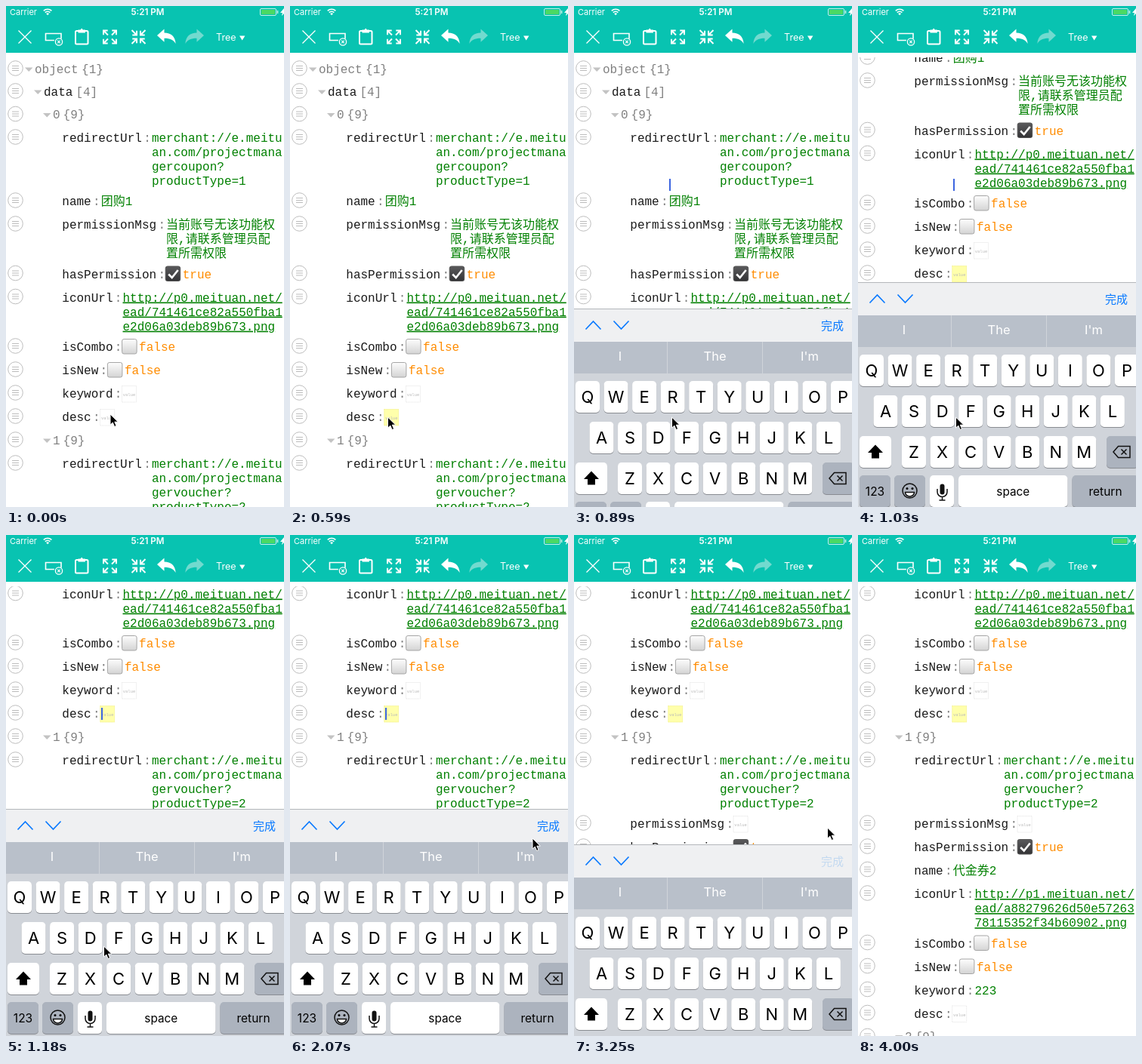
Write an HTML page that moves like this. It is 368 px wide and 664 px high and loops after 4370 ms.

```html
<!DOCTYPE html>
<html lang="zh-CN">
<head>
<meta charset="utf-8">
<title>JSON tree editor</title>
<style>
html, body { margin: 0; width: 100%; height: 100%; overflow: hidden; background: #fff; }
svg { display: block; width: 368px; height: 664px; }
text { white-space: pre; }
.tree { font: 16px "Liberation Mono", "Noto Sans CJK SC", "Noto Sans CJK", monospace; }
.ui { font-family: Inter, "Noto Sans CJK SC", "Noto Sans CJK", sans-serif; }
.link { text-decoration: underline; }
</style>
</head>
<body>
<svg id="stage" viewBox="0 0 368 664">
  <defs>
    <clipPath id="view"><rect y="68" width="368" height="596"/></clipPath>
    <linearGradient id="off" x2="0" y2="1"><stop stop-color="#fdfdfd"/><stop offset="1" stop-color="#d4d4d4"/></linearGradient>
    <linearGradient id="on" x2="0" y2="1"><stop stop-color="#5a5a5c"/><stop offset="1" stop-color="#333335"/></linearGradient>
  </defs>
  <rect width="368" height="664" fill="#fff"/>
  <g clip-path="url(#view)"><g id="tree" class="tree"></g></g>
  <rect id="caret" x="126" y="229" width="2" height="16" fill="#3d66e0"/>

  <g id="bar" class="ui" fill="none" stroke="#fff">
    <rect width="368" height="62" fill="#08c3b1" stroke="none"/>
    <g fill="#fff" stroke="none">
      <text x="5" y="12" font-size="11">Carrier</text>
      <text x="187.5" y="12" font-size="11.6" font-weight="600" text-anchor="middle">5:21 PM</text>
      <text x="278" y="46" font-size="12.6">Tree</text>
      <path d="M309 39.5h7.4l-3.7 6z"/>
      <path d="M368 3l-5 6h3l-1 4l3-3z"/>
    </g>
    <path d="M49.8 6.4a7.6 7.6 0 0 1 10.6 0M51.8 8.7a4.8 4.8 0 0 1 6.6 0" stroke-width="1.6"/>
    <path d="M53.2 10.2a2.8 2.8 0 0 1 3.8 0l-1.9 2z" fill="#fff" stroke="none"/>
    <rect x="336.5" y="3.5" width="21" height="9" rx="1.5" stroke="#c8f0e4"/>
    <rect x="338" y="5" width="18" height="6" fill="#4bd964" stroke="none"/>
    <path d="M359.5 6v4" stroke="#c8f0e4" stroke-width="1.6"/>
    <path d="M16.5 32.5l17 17m0-17l-17 17" stroke-width="1.3"/>
    <path d="M64 45.5H52.5v-9h20.5v7" stroke-width="1.6"/>
    <circle cx="70" cy="47.5" r="4.6" stroke-width="1.3"/>
    <path d="M68.2 45.7l3.6 3.6m0-3.6l-3.6 3.6" stroke-width="1.2"/>
    <rect x="92" y="33" width="16.5" height="17.5" rx="1.5" stroke-width="2"/>
    <path d="M95.5 35.5v-4h3l1.7-2l1.7 2h3v4z" fill="#fff" stroke="none"/>
    <g id="expand" stroke-width="2"></g>
    <g id="shrink" stroke-width="2"></g>
    <path id="undo" d="M200 39l9.5-8.5v5c9 .3 14.2 4.5 15.2 14.5c-3-5.200-7.300-7.200-15.200-7.200v5z" fill="#fff" stroke="none"/>
    <path d="M200 39l9.500-8.500v5c9 .3 14.200 4.500 15.200 14.500c-3-5.200-7.300-7.200-15.200-7.200v5z" fill="#72dacf" stroke="none" transform="translate(462 0) scale(-1 1)"/>
  </g>

  <g id="keys" class="ui"></g>
  <path id="mouse" d="M0 0v14.200l3.300-3.100l2.300 5.400l2.500-1.100l-2.300-5.200h4.500z" fill="#000" stroke="#fff" stroke-width="1" stroke-linejoin="round"/>
</svg>
<script>
const $ = id => document.getElementById(id);
const CH = 9.6, KEY_X = 74.3, LINE = 19.1;
const GREEN = '#008000', GRAY = '#808080', INK = '#1a1a1a', ORANGE = '#ff8c00', BLUE = '#0a7aff';

const text = (x, y, s, fill, more = '') => `<text x="${x}" y="${y}" fill="${fill}" ${more}>${s}</text>`;

// ---- tree rows; y is the middle of a row's first line ----
const handle = y => `<g transform="translate(12.500 ${y - 1.5})" fill="none" stroke="#bdbdbd">
  <circle r="9.800" fill="#fff"/><path d="M-4.500 -3h9m-9 3h9m-9 3h9"/></g>`;

function node(x, y, name, count, color, gap) {
  return handle(y) + `<path d="M${x - 13} ${y - 2.500}h10.500l-5.250 5.500z" fill="#c3c3c3"/>` +
    text(x, y + 4.5, name, color) + text(x + name.length * CH + gap, y + 4.5, count, GRAY);
}

function check(x, y, on) {
  const box = `<rect x="${x + .5}" y="${y - 10.5}" width="19.500" height="19.500" rx="2.500" fill="url(#${on ? 'on' : 'off'})" stroke="${on ? '#555' : '#a5a5a5'}"/>`;
  const tick = on ? `<path d="M${x + 4.5} ${y}l4.500 4.500l8-10" fill="none" stroke="#fff" stroke-width="2.600"/>` : '';
  return box + tick + text(x + 23, y + 5, on, on ? ORANGE : ORANGE);
}

function empty(x, y, id) {
  return `<rect id="${id}" x="${x}" y="${y - 10.5}" width="19" height="21.500" fill="#fff" stroke="#e2e2e2" stroke-dasharray="1 1"/>` +
    text(x + 9.5, y + 3, 'value', '#b9b9b9', 'font-size="5.500" text-anchor="middle"');
}

function field(y, key, value, id = '') {
  const end = KEY_X + key.length * CH;
  let out = handle(y) + text(KEY_X, y + 5, key, INK) + text(end + 2.3, y + 5, ':', GRAY);
  if (value === true) return out + check(end + 11.6, y, 'true');
  if (value === false) return out + check(end + 11.6, y, '').replace('></text>', '>false</text>');
  if (value === '') return out + empty(end + 12, y, id);
  const link = value.startsWith('http') ? 'class="link"' : '';
  value.split('|').forEach((s, i) => out += text(end + 13, y + 5 + i * LINE, s, GREEN, link));
  return out;
}

$('tree').innerHTML =
  node(38, 84, 'object', '{1}', GRAY, 4.5) +
  node(50, 114, 'data', '[4]', INK, 4) +
  node(62, 144.5, '0', '{9}', GRAY, 4) +
  field(175, 'redirectUrl', 'merchant://e.meitu|an.com/projectmana|gercoupon?|productType=1') +
  field(259, 'name', '团购1') +
  field(290, 'permissionMsg', '当前账号无该功能权|限,请联系管理员配|置所需权限'.replace(',', ',')) +
  field(355.5, 'hasPermission', true) +
  field(386.5, 'iconUrl', 'http://p0.meituan.net/|ead/741461ce82a550fba1|e2d06a03deb89b673.png') +
  field(452, 'isCombo', false) +
  field(483, 'isNew', false) +
  field(514, 'keyword', '') +
  field(545, 'desc', '', 'desc') +
  node(62, 576, '1', '{9}', GRAY, 4) +
  field(607, 'redirectUrl', 'merchant://e.meitu|an.com/projectmana|gervoucher?|productType=2') +
  field(691, 'permissionMsg', '') +
  field(722, 'hasPermission', true) +
  field(752.5, 'name', '代金券2') +
  field(784, 'iconUrl', 'http://p1.meituan.net/|ead/a88279626d50e57263|78115352f34b60902.png') +
  field(849.5, 'isCombo', false) +
  field(880.5, 'isNew', false) +
  field(911.5, 'keyword', '223') +
  field(942.5, 'desc', '') +
  node(62, 973.5, '2', '{9}', GRAY, 4);

// ---- toolbar arrows, one per corner ----
const corners = (cx, d) => [0, 90, 180, 270].map(a =>
  `<path transform="translate(${cx} 41) rotate(${a})" d="${d}"/>`).join('');
$('expand').innerHTML = corners(137.5, 'M2.500 -2.500L8 -8M2.800 -8.500H8.500V-2.800');
$('shrink').innerHTML = corners(175.5, 'M9 -9L3 -3M2.500 -8.200V-2.500H8.200');

// ---- keyboard, drawn from its own top edge ----
function key(x, y, w, label, size = 22, dark = false) {
  const box = (dy, c) => `<rect x="${x}" y="${y + dy}" width="${w}" height="42" rx="5" fill="${c}"/>`;
  return box(1, '#898c92') + box(0, dark ? '#acb3be' : '#fff') +
    text(x + w / 2, y + 21 + size * .363, label, '#000', `font-size="${size}" text-anchor="middle"`);
}
const keyRow = (x, y, letters) => [...letters].map((c, i) => key(x + i * 37.55, y, 32, c)).join('');

$('keys').innerHTML =
  `<rect width="368" height="302" fill="#d0d4da"/>
  <rect width="368" height="44" fill="#eff0f2"/><path d="M0 .5h368" stroke="#b4b7bb"/>
  <path d="M15.500 27.500l10-10.500l10 10.500M52.500 16.500l10 10.500l10-10.500" fill="none" stroke="${BLUE}" stroke-width="1.700"/>` +
  text(327, 28, '完成', BLUE, 'id="done" font-size="15" font-weight="500"') +
  `<rect y="44" width="368" height="42" fill="#b9c0ca"/><path d="M123.500 44v42m126-42v42" stroke="#d0d4da"/>` +
  ['I', 'The', "I'm"].map((s, i) => text(61 + i * 125.5, 69, s, '#fff', 'font-size="16.500" text-anchor="middle"')).join('') +
  keyRow(2, 96, 'QWERTYUIOP') + keyRow(20.5, 150, 'ASDFGHJKL') + keyRow(58, 204, 'ZXCVBNM') +
  key(2, 204, 42, '') + key(329, 204, 42, '', 22, true) +
  key(2, 256, 41, '123', 15.5, true) + key(48, 256, 41, '', 22, true) + key(95, 256, 32, '') +
  key(133, 256, 144.5, 'space', 15.3) + key(283.5, 256, 88, 'return', 15.5, true) +
  `<path d="M23 215.500l10 10.500h-5v7.500h-10v-7.500h-5z"/>
  <g fill="none" stroke="#111" stroke-width="1.500">
    <path d="M338 225l6.500-7.500h15.500v15h-15.500zM348.500 221.500l7 7m0-7l-7 7"/>
    <circle cx="68.500" cy="276.500" r="9.500"/><path d="M62.500 278.500h12a6 5.500 0 0 1-12 0z" fill="#fff"/>
    <path d="M105 274v4a6.500 6.500 0 0 0 13 0v-4M111.500 285v4m-4 0h8"/>
  </g>
  <circle cx="65" cy="273.500" r="1.500"/><circle cx="72" cy="273.500" r="1.500"/>
  <rect x="108.500" y="267.500" width="6" height="14" rx="3" fill="#111"/>`;

// ---- motion ----
const LOOP = 4370;
const TICKS = [0, 150, 300, 450, 590, 740, 890, 1030, 1180, 1330, 1480, 1620, 1770, 1920, 2070,
  2220, 2360, 2510, 2660, 2810, 2950, 3100, 3250, 3400, 3550, 3700, 3850, 4000];
const MOUSE = [[0, 138, 541], [450, 129.5, 545], [1330, 129.5, 545], [1480, 141, 536], [2070, 321, 402],
  [2510, 335.5, 388], [3250, 335.5, 388], [3850, 342, 658], [4000, 343, 690]];
const KEYS = [[590, 664], [740, 567], [890, 401], [1030, 366], [1180, 363], [3100, 363],
  [3250, 410], [3400, 585], [3550, 652], [3700, 664]];
const SCROLL = [[890, 0], [1030, 190], [1180, 308]];

function at(track, t, k = 1) {
  if (t <= track[0][0]) return track[0][k];
  const i = track.findIndex(p => p[0] >= t);
  if (i < 0) return track[track.length - 1][k];
  const a = track[i - 1], b = track[i];
  return a[k] + (b[k] - a[k]) * (t - a[0]) / (b[0] - a[0]);
}
const within = (t, a, b) => t >= a && t < b;
const show = (id, on) => $(id).setAttribute('visibility', on ? 'visible' : 'hidden');
const move = (id, x, y) => $(id).setAttribute('transform', `translate(${x} ${y})`);

function draw(now) {
  const t = TICKS.filter(k => k <= now % LOOP).pop();
  move('tree', 0, -at(SCROLL, t));
  move('keys', 0, at(KEYS, t));
  move('mouse', at(MOUSE, t, 1), at(MOUSE, t, 2));
  show('caret', within(t, 740, 3250) && !within(t, 1620, 1920) && !within(t, 2660, 2950));
  const active = t >= 590;
  $('desc').setAttribute('fill', active ? '#ffffab' : '#fff');
  $('desc').setAttribute('stroke', active ? '#f0ee7c' : '#e2e2e2');
  $('done').setAttribute('fill', within(t, 2950, 3400) ? '#c3d9f0' : BLUE);
}

const start = performance.now();
function loop() {
  draw(performance.now() - start);
  requestAnimationFrame(loop);
}
loop();
</script>
</body>
</html>
```
